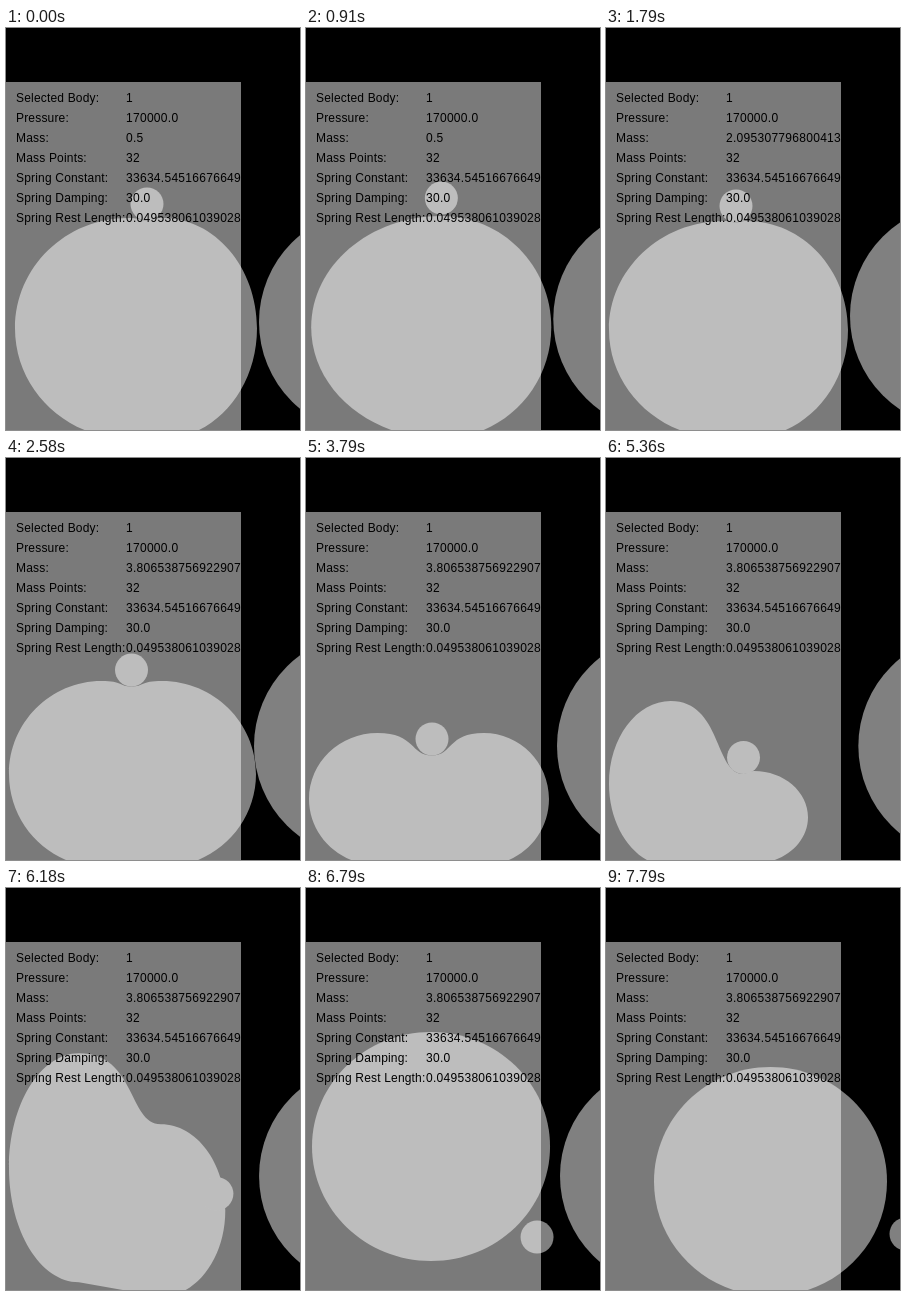
Write an HTML page with a canvas that moves like this. It is 294 px wide and 402 px high and loops after 7.85 s.

```html
<!DOCTYPE html>
<html lang="en">
<head>
<meta charset="utf-8">
<title>Soft bodies</title>
<style>
html, body { margin: 0; width: 100%; height: 100%; overflow: hidden; background: #000; }
canvas { position: absolute; left: 0; top: 0; }
pre {
  position: absolute; top: 60px; left: 10px; margin: 0;
  font: 12px/20px "Liberation Sans", Arial, sans-serif;
  letter-spacing: .18px; color: #000;
}
.values { left: 120px; letter-spacing: .29px; }
</style>
</head>
<body>
<canvas id="stage" width="294" height="402"></canvas>
<pre>Selected Body:
Pressure:
Mass:
Mass Points:
Spring Constant:
Spring Damping:
Spring Rest Length:</pre>
<pre class="values">1
170000.0
<span id="mass">0.5</span>
32
33634.54516676649
30.0
0.049538061039028</pre>
<script>
const LOOP = 7850, WIDTH = 294, FLOOR = 402;
const BALL = 16.5, NEIGHBOUR = 112.5, REST_HEIGHT = 229;
const ctx = document.getElementById('stage').getContext('2d');
const massText = document.getElementById('mass');

const mix = (a, b, u) => a + (b - a) * u;

// Smooth curve through [time, value] points that never overshoots them.
function track(...keys) {
  const last = keys.length - 1;
  const slope = n => (keys[n + 1][1] - keys[n][1]) / (keys[n + 1][0] - keys[n][0]);
  const tangent = n => {
    if (n === 0) return slope(0);
    if (n === last) return slope(last - 1);
    const a = slope(n - 1), b = slope(n);
    return a * b > 0 ? 2 * a * b / (a + b) : 0;
  };
  return t => {
    if (t <= keys[0][0]) return keys[0][1];
    if (t >= keys[last][0]) return keys[last][1];
    const i = keys.findIndex(k => k[0] > t) - 1;
    const [t0, a] = keys[i], [t1, b] = keys[i + 1];
    const u = (t - t0) / (t1 - t0), v = 1 - u;
    return a * v * v * (1 + 2 * u) + b * u * u * (3 - 2 * u) +
      (t1 - t0) * u * v * (tangent(i) * v - tangent(i + 1) * u);
  };
}

const ballX = track([0, 141], [1790, 130], [2580, 125.5], [3790, 126],
  [5360, 137.5], [6000, 203], [6790, 231], [7790, 300]);
const ballY = track([0, 176], [820, 170], [1790, 178], [2580, 212], [3790, 281],
  [5360, 299.5], [6000, 301], [6790, 349], [7250, 384], [7790, 346]);

const bodyLeft = track([0, 9], [1790, 3], [6400, 3], [6790, 6], [7240, 44], [7790, 48]);
const bodyRight = track([0, 251], [1790, 242], [2580, 250], [3790, 243],
  [5360, 202], [6790, 244], [7240, 276], [7790, 281]);
const bodyTop = track([0, 190], [820, 188], [1790, 193], [2580, 223], [3790, 275],
  [5360, 243], [5900, 182], [6790, 144], [7015, 143], [7790, 179]);
// How much lower the right lobe stands, and how far the ball has let go.
const lean = track([3790, 0], [5360, 70], [5900, 130], [6400, 0]);
const release = track([5900, 0], [6400, 1]);

const neighbourLeft = track([0, 253], [1790, 244], [2580, 248], [3790, 251],
  [6790, 254], [7240, 280], [7790, 315]);
const neighbourY = track([0, 294], [1790, 288]);
const mass = track([1640, 0.5], [1790, 2.095307796800413], [1940, 3.806538756922907]);

function circle(x, y, r) {
  ctx.beginPath();
  ctx.arc(x, y, r, 0, 7);
  ctx.fill();
}

// Quarter ellipse; upright tells whether it starts out vertically.
function quarter(x0, y0, x1, y1, upright) {
  const k = .5523, dx = (x1 - x0) * k, dy = (y1 - y0) * k;
  if (upright) ctx.bezierCurveTo(x0, y0 + dy, x1 - dx, y1, x1, y1);
  else ctx.bezierCurveTo(x0 + dx, y0, x1, y1 - dy, x1, y1);
}

// One side of the body: its crest moves away from the dip as the dip deepens.
function lobe(wall, top, dipX, dipY) {
  const depth = dipY - top;
  const crest = dipX + .6 * depth / (depth + 8) * (wall - dipX);
  const base = Math.min(FLOOR + .04 * (FLOOR - top), top + REST_HEIGHT);
  return { wall, top, crest, base, waist: (top + base) / 2 };
}

// Two lobes joined by the dip under the ball; the stage edge flattens the base.
function drawBody(t) {
  const x0 = bodyLeft(t), x1 = bodyRight(t);
  const top = bodyTop(t), topRight = top + lean(t), free = release(t);
  const dipX = mix(ballX(t), (x0 + x1) / 2, free);
  const dipY = Math.max(mix(ballY(t) + BALL, top, free), topRight);
  const l = lobe(x0, top, dipX, dipY);
  const r = lobe(x1, topRight, dipX, dipY);

  ctx.beginPath();
  ctx.moveTo(l.wall, l.waist);
  quarter(l.wall, l.waist, l.crest, l.top, true);
  ctx.bezierCurveTo(mix(l.crest, dipX, .7), l.top, mix(dipX, l.crest, .4), dipY, dipX, dipY);
  ctx.bezierCurveTo(mix(dipX, r.crest, .4), dipY, mix(r.crest, dipX, .7), r.top, r.crest, r.top);
  quarter(r.crest, r.top, r.wall, r.waist, false);
  quarter(r.wall, r.waist, r.crest, r.base, true);
  ctx.lineTo(l.crest, l.base);
  quarter(l.crest, l.base, l.wall, l.waist, false);
  ctx.fill();
}

function frame(now) {
  const t = now % LOOP;
  ctx.fillStyle = '#000';
  ctx.fillRect(0, 0, WIDTH, FLOOR);

  ctx.fillStyle = '#808080';
  drawBody(t);
  circle(ballX(t), ballY(t), BALL);
  circle(neighbourLeft(t) + NEIGHBOUR, neighbourY(t), NEIGHBOUR);

  ctx.fillStyle = 'rgba(255, 255, 255, .48)';
  ctx.fillRect(0, 54, 235, FLOOR - 54);

  const step = 1640 + Math.floor((t - 1640) / 75) * 75;
  massText.textContent = +mass(step).toFixed(15);
  requestAnimationFrame(frame);
}
requestAnimationFrame(frame);
</script>
</body>
</html>
```
